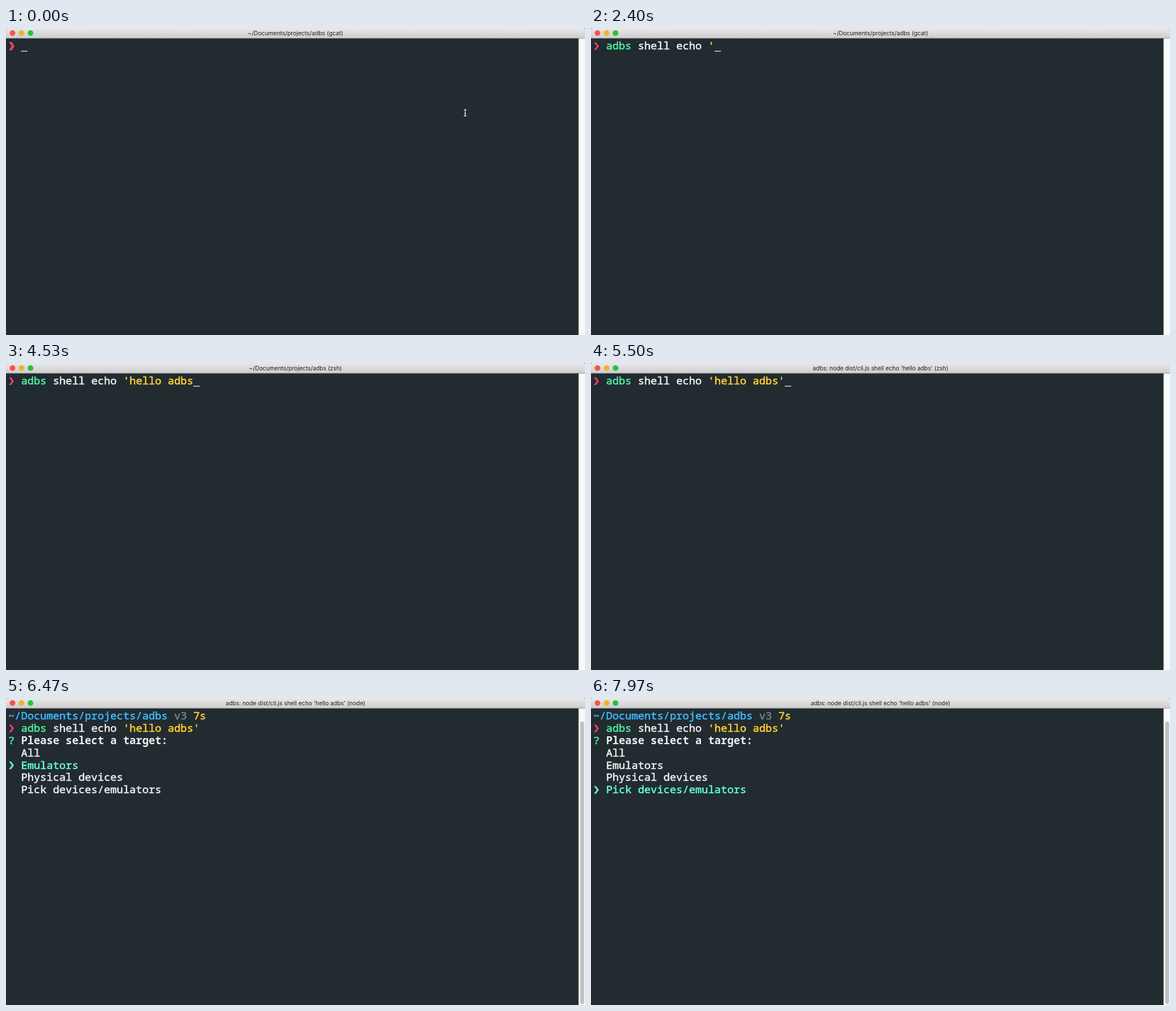
These frames come from a looping animation (1027 px wide and 545 px high, 8000 ms). An HTML page with a canvas:

```html
<!DOCTYPE html>
<html lang="en">
<head>
<meta charset="utf-8">
<title>Terminal session</title>
<style>
  html, body { margin: 0; width: 100%; height: 100%; overflow: hidden; background: #222b30; }
  canvas { display: block; }
</style>
</head>
<body>
<canvas id="stage" width="1027" height="545"></canvas>
<script>
const ctx = document.getElementById('stage').getContext('2d');
const W = 1027, H = 545, LOOP = 8000;
const LEFT = 4, CELL = 11.32, BASE = 38.2, LINE = 21.83;
const color = {
  back: '#222b30', text: '#eceff0', gray: '#7b8184', green: '#4feda0', aqua: '#62fbd9',
  yellow: '#ffd030', blue: '#3db9ff', pink: '#ff3b72', red: '#ff5c57'
};

const COMMAND = "adbs shell echo 'hello adbs'";
const keyTimes = [
  100, 230, 330, 430, 830, 930, 1000, 1130, 1230, 1330, 1430, 1600, 1670, 1800,
  2100, 2200, 2300, 2700, 2900, 3030, 3130, 3230, 3530, 3600, 3900, 4130, 4470, 4670
];
const ENTER = 5530, MENU = 5830;
const choices = ['All', 'Emulators', 'Physical devices', 'Pick devices/emulators'];
const moveTimes = [6330, 7200, 7600];
const titles = [
  [0, '~/Documents/projects/adbs (gcat)'],
  [3000, '~/Documents/projects/adbs (zsh)'],
  [5500, `adbs: node dist/cli.js shell echo 'hello adbs' (zsh)`],
  [6330, `adbs: node dist/cli.js shell echo 'hello adbs' (node)`]
];

const passed = (times, t) => times.filter(at => at <= t).length;

function box(x, y, w, h, fill, radius = 0) {
  ctx.fillStyle = fill;
  ctx.beginPath();
  ctx.roundRect(x, y, w, h, radius);
  ctx.fill();
}

// A thin outline thickens the regular face to a medium weight.
function write(row, col, text, fill, bold = false) {
  const x = LEFT + col * CELL, y = BASE + row * LINE;
  ctx.font = `${bold ? 700 : 400} 18.87px "Noto Sans Mono", monospace`;
  ctx.textAlign = 'left';
  ctx.fillStyle = ctx.strokeStyle = fill;
  ctx.lineWidth = 0.6;
  ctx.lineJoin = 'round';
  ctx.fillText(text, x, y);
  if (!bold) ctx.strokeText(text, x, y);
}

function chevron(row, fill, heavy = false) {
  const y = BASE + row * LINE - 6, tall = heavy ? 7.5 : 6.7;
  const tip = heavy ? 15 : 14, thick = heavy ? 5 : 3.7;
  ctx.fillStyle = fill;
  ctx.beginPath();
  ctx.moveTo(5.3, y - tall);
  ctx.lineTo(5.3 + thick, y - tall);
  ctx.lineTo(tip, y);
  ctx.lineTo(5.3 + thick, y + tall);
  ctx.lineTo(5.3, y + tall);
  ctx.lineTo(tip - thick, y);
  ctx.fill();
}

function cursor(row, col) {
  box(LEFT + col * CELL, BASE + row * LINE + 2.3, CELL, 1.3, color.text);
}

function pointer() {
  ctx.strokeStyle = '#f4f4f4';
  ctx.lineWidth = 1.2;
  ctx.beginPath();
  ctx.moveTo(812, 144.5);
  ctx.quadraticCurveTo(814.5, 144.5, 814.5, 147);
  ctx.quadraticCurveTo(814.5, 144.5, 817, 144.5);
  ctx.moveTo(814.5, 147);
  ctx.lineTo(814.5, 154);
  ctx.moveTo(812, 156.5);
  ctx.quadraticCurveTo(814.5, 156.5, 814.5, 154);
  ctx.quadraticCurveTo(814.5, 156.5, 817, 156.5);
  ctx.moveTo(813, 151.5);
  ctx.lineTo(816, 151.5);
  ctx.stroke();
}

function titleBar(t) {
  const shade = ctx.createLinearGradient(0, 0, 0, 18);
  shade.addColorStop(0, '#e8e8e8');
  shade.addColorStop(1, '#cecece');
  box(0, 0, W, 18, shade, [2, 2, 0, 0]);
  box(0, 17.6, W, 0.9, '#aeaeae');
  ['#fb504b', '#eeb32c', '#27c13f'].forEach((fill, i) => box(6.5 + 16 * i, 4, 10, 10, fill, 5));
  ctx.font = '10.35px Inter, sans-serif';
  ctx.textAlign = 'center';
  ctx.fillStyle = '#202020';
  ctx.fillText(titles.filter(([at]) => at <= t).pop()[1], W / 2, 13);
}

function commandLine(row, count) {
  const typed = COMMAND.slice(0, count);
  write(row, 2, typed.slice(0, 4), count < 3 ? color.red : color.green);
  write(row, 7, typed.slice(5, 16), color.text);
  write(row, 18, typed.slice(16), color.yellow);
}

function menu(selected) {
  write(0, 0, '~/Documents/projects/adbs', color.blue);
  write(0, 26, 'v3', color.gray);
  write(0, 29, '7s', color.yellow);
  write(2, 0, '?', color.green);
  write(2, 2, 'Please select a target:', color.text, true);
  if (selected === 0) write(2, 26, '(Use arrow keys)', color.gray);
  choices.forEach((name, i) => write(3 + i, 2, name, i === selected ? color.aqua : color.text));
  chevron(3 + selected, color.aqua);
}

function draw(t) {
  const open = t >= MENU, row = open ? 1 : 0, count = passed(keyTimes, t);
  box(0, 0, W, H, color.back);
  titleBar(t);
  box(1015.6, 18.5, 11.4, H - 18.5, '#fafafa');

  chevron(row, color.pink, count === 0);
  commandLine(row, count);
  if (open) {
    menu(passed(moveTimes, t));
    box(1018.5, 41.5, 7, 502, '#c1c1c1', 3.5);
  } else if (t >= ENTER) {
    cursor(1, 0);
  } else {
    cursor(0, 2 + count);
  }
  if (count === 0) pointer();
}

const start = performance.now();
function tick() {
  draw((performance.now() - start) % LOOP);
  requestAnimationFrame(tick);
}
tick();
</script>
</body>
</html>
```
